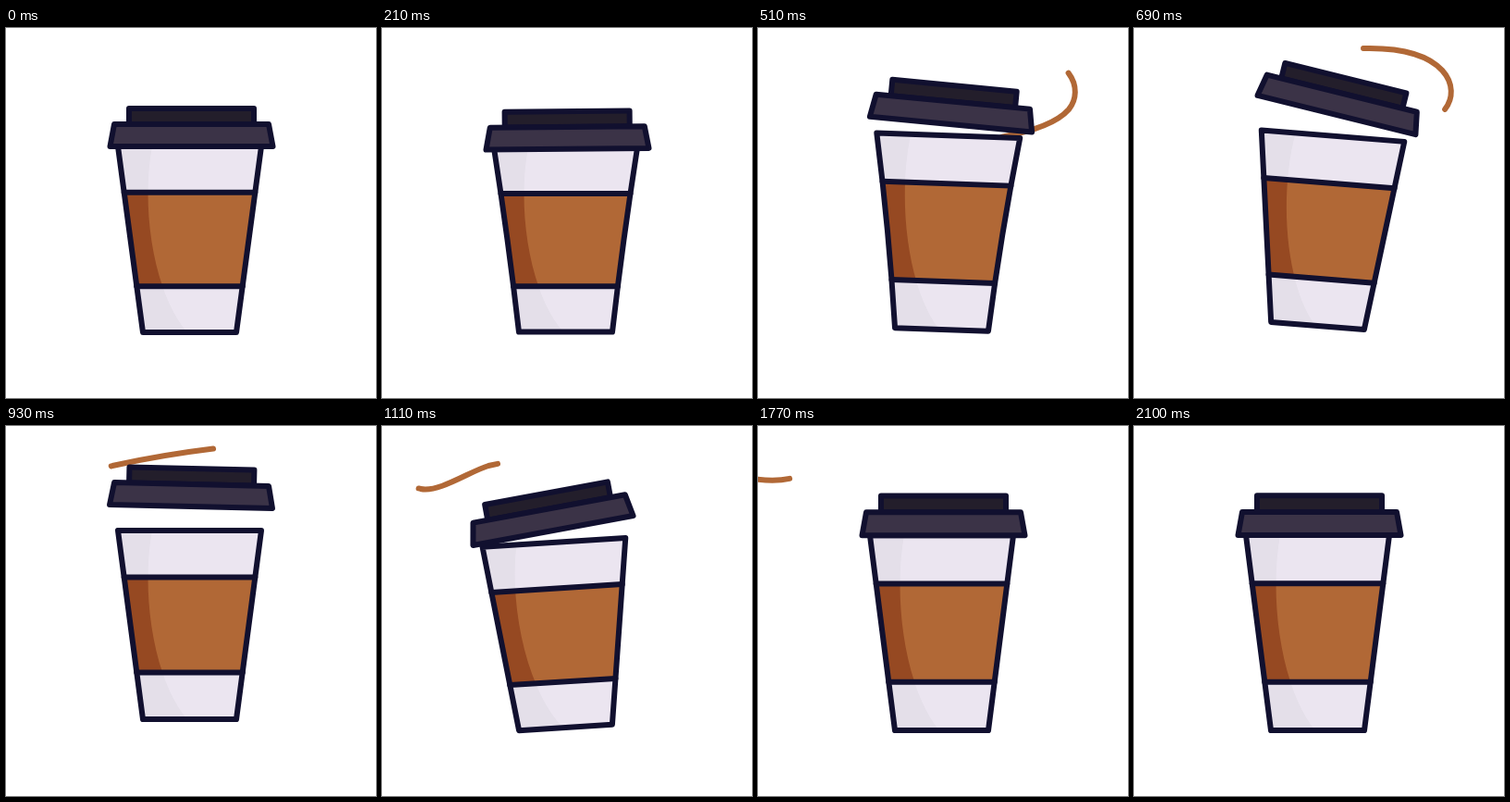
An HTML page with a canvas for the animation above (3460 ms loop, 400x400 px).

```html
<!DOCTYPE html>
<html lang="en">
<head>
<meta charset="utf-8">
<title>Coffee cup</title>
<style>
  html, body { margin: 0; width: 100%; height: 100%; overflow: hidden; background: #fff; }
  canvas { display: block; width: 400px; height: 400px; }
</style>
</head>
<body>
<canvas id="stage"></canvas>
<script>
const LOOP = 3460, STEP = 30, END = 2100;
const INK = '#11102f', COFFEE = '#b16836', COFFEE_DARK = '#964922';
const PAPER = '#ebe5f0', PAPER_DARK = '#e4dfe9', LID = '#3b3347', LID_TOP = '#231e2b';
const CENTER = 198.5, BAND_LOW = 0.2475, BAND_HIGH = 0.752;

// Each track lists [time in ms, value].
const tracks = {
  base: [[0, 329], [360, 328], [690, 322], [930, 317], [1110, 326], [1230, 329]],
  height: [[0, 201], [130, 194], [360, 212], [690, 206], [930, 204], [1110, 200.5],
    [1260, 200], [1440, 211], [1620, 209], [1860, 211.5], [2070, 211]],
  tilt: [[360, 0], [690, 4.6], [930, 0], [1110, -3.6], [1440, 0]],
  pinch: [[0, 0], [130, -2], [360, 9], [570, 0]],
  lidX: [[360, 200.5], [690, 219], [930, 200], [1110, 185], [1440, 200.5]],
  lidY: [[0, 128], [130, 135], [360, 115], [690, 94], [930, 87], [1110, 113],
    [1260, 128], [1440, 118], [1620, 120], [1860, 117.5], [2070, 118]],
  lidTilt: [[0, 0], [360, -0.9], [690, 13.9], [930, 1.3], [1110, -10.5], [1440, 0]],
  lidScale: [[0, 1], [130, 0.97], [360, 1.045], [690, 1], [1110, 1], [1440, 1.045]],
  head: [[390, 0], [540, 165], [690, 230.5], [930, 366.5], [1110, 445.5], [1440, 542],
    [1650, 590], [1980, 650]],
  tail: [[450, 0], [540, 25], [690, 93.5], [930, 254.5], [1110, 355], [1440, 486.5],
    [1650, 538], [2080, 636]]
};

const splash = new Path2D('M250 120C290 114 322 104 336 88C354 66 340 20 249 22' +
  'C224 24 170 31 115 43C95 49 62 72 42 68C26 65 18 50 25 34' +
  'C33 18 56 16 60 33C61 36 60 39 58 42C48 58 22 62-12 56L-60 46');

const canvas = document.getElementById('stage');
const ctx = canvas.getContext('2d');
const ratio = window.devicePixelRatio || 1;
canvas.width = canvas.height = 400 * ratio;

const slope = (keys, i) => (keys[i + 1][1] - keys[i][1]) / (keys[i + 1][0] - keys[i][0]);

function tangent(keys, i) {
  if (i === 0 || i === keys.length - 1) return 0;
  const before = slope(keys, i - 1), after = slope(keys, i);
  return before * after <= 0 ? 0 : 2 * before * after / (before + after);
}

// Monotone cubic interpolation, so no pose overshoots its keys.
function sample(keys, t) {
  const last = keys.length - 1;
  if (t <= keys[0][0]) return keys[0][1];
  if (t >= keys[last][0]) return keys[last][1];
  const i = keys.findIndex(key => key[0] > t) - 1;
  const [t0, a] = keys[i], [t1, b] = keys[i + 1];
  const d = t1 - t0, u = (t - t0) / d, v = 1 - u;
  return a * (1 + 2 * u) * v * v + b * u * u * (3 - 2 * u)
    + d * u * v * (tangent(keys, i) * v - tangent(keys, i + 1) * u);
}

function polygon(points, fill) {
  ctx.beginPath();
  points.forEach(([x, y]) => ctx.lineTo(x, y));
  ctx.closePath();
  ctx.fillStyle = fill;
  ctx.fill();
  ctx.stroke();
}

function place(x, y, degrees, draw) {
  ctx.save();
  ctx.translate(x, y);
  ctx.rotate(degrees * Math.PI / 180);
  draw();
  ctx.restore();
}

function drawSplash({ head, tail }) {
  if (head - tail < 1) return;
  ctx.save();
  ctx.strokeStyle = COFFEE;
  ctx.setLineDash([head - tail, 2000]);
  ctx.lineDashOffset = -tail;
  ctx.stroke(splash);
  ctx.restore();
}

function drawCup({ height, pinch }) {
  const half = v => 50.5 + 27 * v - 4 * pinch * v * (1 - v);
  const mid = 64 - 2 * pinch;
  const outline = new Path2D();
  outline.moveTo(-50.5, 0);
  outline.quadraticCurveTo(-mid, -height / 2, -77.5, -height);
  outline.lineTo(77.5, -height);
  outline.quadraticCurveTo(mid, -height / 2, 50.5, 0);
  outline.closePath();

  const shade = new Path2D();
  shade.moveTo(-40.5, -height);
  shade.bezierCurveTo(-52.5, -0.69 * height, -40.5, -0.22 * height, -2.5, 0);
  shade.lineTo(-100, 0);
  shade.lineTo(-100, -height);
  shade.closePath();

  const fillPart = (color, dark) => {
    ctx.fillStyle = color;
    ctx.fillRect(-100, -height, 200, height);
    ctx.fillStyle = dark;
    ctx.fill(shade);
  };
  ctx.save();
  ctx.clip(outline);
  fillPart(PAPER, PAPER_DARK);
  ctx.beginPath();
  ctx.rect(-100, -BAND_HIGH * height, 200, (BAND_HIGH - BAND_LOW) * height);
  ctx.clip();
  fillPart(COFFEE, COFFEE_DARK);
  ctx.restore();

  ctx.stroke(outline);
  for (const v of [BAND_LOW, BAND_HIGH]) {
    ctx.beginPath();
    ctx.moveTo(-half(v), -v * height);
    ctx.lineTo(half(v), -v * height);
    ctx.stroke();
  }
}

function drawLid({ lidScale }) {
  const top = -41 * lidScale, rim = -24 * lidScale;
  polygon([[-67.5, top], [67.5, top], [67.5, rim], [-67.5, rim]], LID_TOP);
  polygon([[-83.5, rim], [83.5, rim], [88, 0], [-88, 0]], LID);
}

function render(t) {
  const pose = {};
  for (const name in tracks) pose[name] = sample(tracks[name], t);
  ctx.setTransform(ratio, 0, 0, ratio, 0, 0);
  ctx.fillStyle = '#fff';
  ctx.fillRect(0, 0, 400, 400);
  ctx.lineWidth = 6;
  ctx.lineJoin = ctx.lineCap = 'round';
  ctx.strokeStyle = INK;
  drawSplash(pose);
  place(CENTER, pose.base, pose.tilt, () => drawCup(pose));
  place(pose.lidX, pose.lidY, pose.lidTilt, () => drawLid(pose));
}

const start = performance.now();
function tick() {
  const t = (performance.now() - start) % LOOP;
  render(Math.min(Math.floor(t / STEP) * STEP, END));
  requestAnimationFrame(tick);
}
tick();
</script>
</body>
</html>
```
